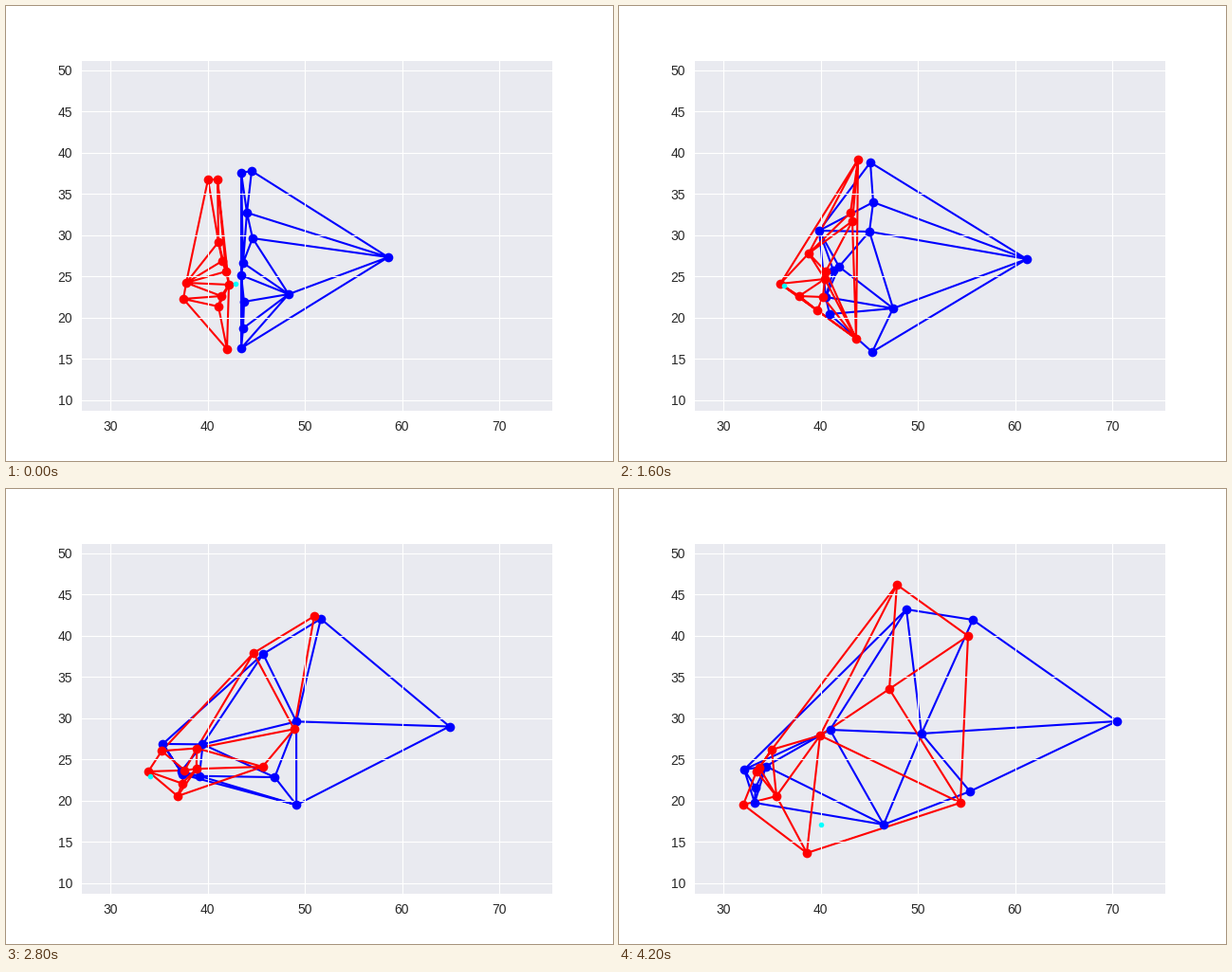
Animation of 640 by 480 pixels, one loop 4.3 s. Source, as a matplotlib script:

```python
import numpy as np
import matplotlib.pyplot as plt
from matplotlib.animation import FuncAnimation
from matplotlib.tri import Triangulation

FRAMES, INTERVAL = 43, 100
KEY_TIMES = np.array([0, 800, 1600, 2400, 3200, 3600, 4200])

plt.rcParams["font.family"] = "Liberation Sans"


def to_data(x, y):
    """Stage pixels to pitch units."""
    return 30 + (np.asarray(x) - 110) / 10.25, 10 + (415.7 - np.asarray(y)) / 8.7


def smooth(t, values):
    """Cubic Hermite curve through the key values."""
    slope = np.gradient(values, KEY_TIMES, edge_order=2)
    i = min(np.searchsorted(KEY_TIMES, t, side="right") - 1, len(KEY_TIMES) - 2)
    h = KEY_TIMES[i + 1] - KEY_TIMES[i]
    u = (t - KEY_TIMES[i]) / h
    return ((1 + 2 * u) * (1 - u) ** 2 * values[i] + u * (1 - u) ** 2 * h * slope[i]
            + u * u * (3 - 2 * u) * values[i + 1] + u * u * (u - 1) * h * slope[i + 1])


class Team:
    def __init__(self, ax, color, order):
        self.paths = []
        self.lines, = ax.plot([], [], color=color, lw=1.5, zorder=order / 10)
        self.dots, = ax.plot([], [], "o", color=color, ms=7, mew=0, zorder=10 + order)

    def player(self, xs, ys):
        self.paths.append(to_data(xs, ys))

    def move(self, t):
        x = np.array([smooth(t, px) for px, _ in self.paths])
        y = np.array([smooth(t, py) for _, py in self.paths])
        edges = Triangulation(x, y).edges
        gap = np.full((len(edges), 1), np.nan)
        self.lines.set_data(np.hstack([x[edges], gap]).ravel(),
                            np.hstack([y[edges], gap]).ravel())
        self.dots.set_data(x, y)


fig = plt.figure(figsize=(6.4, 4.8), dpi=100, facecolor="white")
ax = fig.add_axes([0.125, 0.11, 0.775, 0.77], facecolor="#E9EAF0")
(x0, x1), (y0, y1) = to_data([80, 576], [427.2, 57.6])
ax.set(xlim=(x0, x1), ylim=(y0, y1),
       xticks=range(30, 71, 10), yticks=range(10, 51, 5))
ax.set_axisbelow(True)
ax.grid(color="white", lw=0.8)
ax.tick_params(length=0, pad=7, labelsize=10, labelcolor="0.15")
for spine in ax.spines.values():
    spine.set_visible(False)

blue = Team(ax, "blue", 0)
blue.player((248, 251, 265, 307, 353.5, 365, 373), (176, 175, 165, 145, 131, 128, 138))
blue.player((259, 260, 268, 290, 325, 346, 370), (174, 192, 207, 231, 262, 282, 319))
blue.player((254, 248.5, 211, 177, 158, 156, 155), (218, 220, 237, 259, 278, 286, 292.5))
blue.player((260, 261, 264, 268, 276.5, 286, 303), (245, 249, 238, 198, 151, 133, 127))
blue.player((250, 249, 232, 211, 208, 212, 222.5), (271, 270, 275, 275, 262, 255, 254))
blue.player((403, 412, 430, 454, 483, 501, 525), (265, 266, 267, 260, 241, 236, 245))
blue.player((248, 243, 226, 215, 189, 170, 143), (284, 283, 279, 291, 315, 324, 331))
blue.player((298, 294, 289, 284, 283, 282, 279), (304, 310.5, 319, 308.5, 306, 321, 354))
blue.player((251, 247, 218, 198, 173, 158, 144), (312, 310.5, 307, 302, 301, 301, 315))
blue.player((250, 242, 222, 197, 171, 155, 132), (340, 337, 325, 309, 290, 291, 296))
blue.player((248, 247, 267, 297, 312, 315, 319), (361, 366, 365, 349, 314, 293, 258))

red = Team(ax, "red", 1)
red.player((213, 218, 244, 283, 324, 342, 360), (183, 204, 218, 239, 271, 293, 331))
red.player((223, 226, 252, 301, 345, 357, 368), (183, 181, 162, 141, 132, 137, 155))
red.player((224, 233, 246, 256, 267, 275, 293), (249, 246, 227, 194, 151, 130, 101))
red.player((228, 222, 200, 175, 156, 152, 145), (269, 267, 261, 268, 285, 291, 298))
red.player((232, 231, 218, 205, 200, 202, 212), (280, 280, 280, 278, 268, 263, 260))
red.player((190, 186, 170, 155, 146, 142, 131), (292, 292, 293, 295, 304, 315, 333))
red.player((235, 232, 217, 205, 195, 185, 166), (294, 292, 288, 290, 302, 309, 324))
red.player((227, 226, 215, 196, 181, 173, 161), (306, 305, 307, 303, 289, 281, 275))
red.player((187, 188, 190, 185, 179, 183, 198), (309, 308, 306, 313, 339, 357, 384))
red.player((224, 221, 209, 196, 174, 163, 148), (317, 319, 321, 316, 305, 301, 294))
red.player((233, 234, 250, 268, 272, 276, 285), (362, 361, 351, 317, 267, 242, 211))

ball, = ax.plot([], [], "o", color="cyan", ms=4, mew=0, zorder=20)
ball_x, ball_y = to_data((242, 215, 174, 160, 145, 144, 213),
                         (293, 294, 295, 297, 309, 312, 354))


def update(frame):
    t = frame * INTERVAL
    blue.move(t)
    red.move(t)
    ball.set_data([np.interp(t, KEY_TIMES, ball_x)], [np.interp(t, KEY_TIMES, ball_y)])
    return blue.lines, red.lines, blue.dots, red.dots, ball


anim = FuncAnimation(fig, update, frames=FRAMES, interval=INTERVAL, repeat=True)
plt.show()
```
